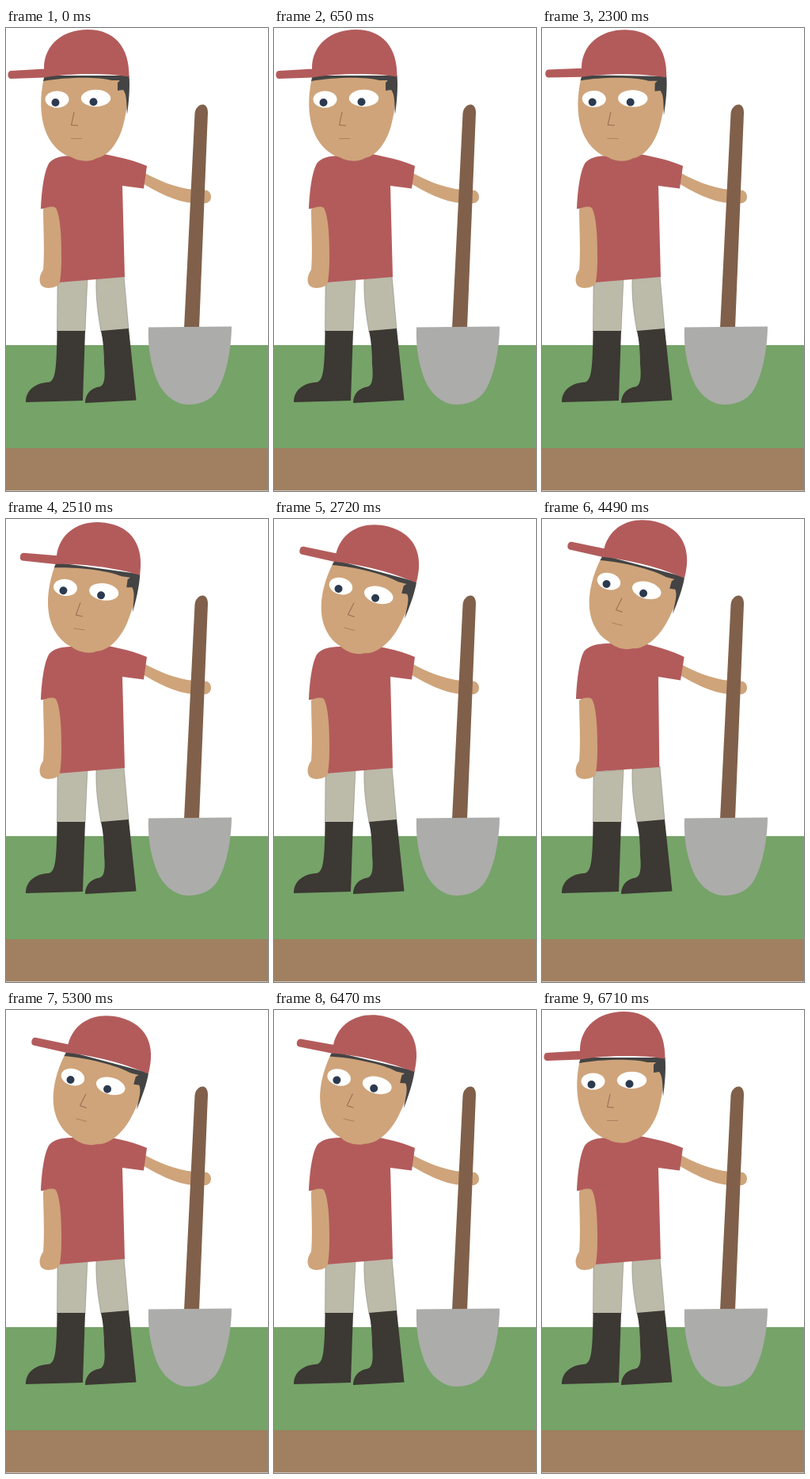
These frames come from a looping animation (331 px wide and 584 px high, 8000 ms). An HTML page:

```html
<!DOCTYPE html>
<html lang="en">
<head>
<meta charset="utf-8">
<title>Worker with a shovel</title>
<style>
  html, body { margin: 0; height: 100%; overflow: hidden; background: #fff; }
  svg { display: block; width: 100%; height: 100%; }
  .red { fill: #b35b5b; }
  .skin { fill: #cfa47a; }
  .pants { fill: #bcbaa9; stroke: #444; stroke-width: .3; }
  .boot { fill: #3c3833; }
  .line { fill: none; stroke: #8a5a48; stroke-width: .8; }
</style>
</head>
<body>
<svg viewBox="0 0 331 584">
  <rect y="400" width="331" height="130" fill="#75a368"/>
  <rect y="530" width="331" height="53.5" fill="#a08061"/>

  <!-- right arm, behind the shovel -->
  <path class="skin" d="M165 177C190 192 215 202 238 204L250 205C256 204 259 208 259 213C259 218 256 221 250 221L236 221C215 219 192 208 168 193Z"/>
  <path fill="#80604a" d="M238.500 108C239 101 244 96.500 248.500 96.500C253 97 255 101 255 107L244 379H225Z"/>
  <path fill="#acacaa" d="M180 377.500L285 376.500C285 401 279 440 265 460C256 471 243 475 231 475C213 475 197 462 189 440C182 420 179 400 180 377.500Z"/>

  <path class="pants" d="M65 319L103 316L100 383H64.500Z"/>
  <path class="pants" d="M114 315L149 312L155 380L120 383C116 360 113 340 114 315Z"/>
  <path class="boot" d="M64.500 382H100L97 470L25 472C25 456 38 448 52 447C62 447 64 435 64.500 382Z"/>
  <path class="boot" d="M120 382L155 379L164.500 469.500L100 473C100 461 108 454 118 452.500C126 451 125 435 124 424C124 410 123 395 120 382Z"/>

  <path class="red" id="shirt"/>
  <path class="skin" d="M47 229C50 226 59 224 63 227C69 238 70 265 70 290C70 305 69 315 67.500 323C63 328 50 330 45 325C41 320 42 312 47 305C49 280 47 250 47 229Z"/>

  <g id="head">
    <path class="skin" d="M48 62C42 90 44 110 48 124C54 146 70 160 83 163C92 169 108 169 115 164C131 161 143 142 148 123C153 104 155 85 155 62Z"/>
    <path fill="#444" d="M47 67L49 60L155.500 60C157 75 155 95 153 109C152 96 153 84 148 78L141 79V69L144 66H133C115 61 75 62 47 67Z"/>
    <path class="red" d="M48 62V51C48 21 72 2 103 2C138 2 156 25 155.500 61.500C125 56.500 80 57 48 62.500L6 64C1.500 64 1 54.500 6 54L49 51.500Z"/>
    <ellipse cx="64.500" cy="90" rx="15" ry="10.500" fill="#fff"/>
    <ellipse cx="113.500" cy="88.500" rx="18.700" ry="10.700" fill="#fff"/>
    <g fill="#2c3a50">
      <ellipse class="pupil" cx="62.500" cy="94" rx="5"/>
      <ellipse class="pupil" cx="110.500" cy="93.300" rx="5"/>
    </g>
    <path class="line" d="M86 106L82.500 122.500L91 123"/>
    <path class="line" d="M82 139.500H96" opacity=".6"/>
  </g>
</svg>
<script>
const LOOP = 8000, STEP = 30, OFFSET = 20;
const head = document.getElementById('head');
const shirt = document.getElementById('shirt');
const pupils = document.querySelectorAll('.pupil');

const ramp = (t, a, b) => Math.min(1, Math.max(0, (t - a) / (b - a)));
// rises to 1 halfway between a and b, then falls back to 0
const pulse = (t, a, b) => 1 - Math.abs(2 * ramp(t, a, b) - 1);

// b: breath, 0 to 1
const shirtPath = b => `M${44 - b} ${228 - b}
  C${45 - b} ${205 - 2 * b} ${48 - b} ${182 - 4 * b} ${54 - b} ${171 - 4 * b}
  C60 ${163 - 4 * b} 70 ${161.5 - 4 * b} 82 ${161 - 4 * b}
  L121 ${158.5 - 3 * b}
  C142 ${162.5 - 3 * b} ${164 + b} ${167.5 - b} ${178 + 1.7 * b} 174
  L${174 + b} ${202.5 + b} L147 199
  L${150 - 1.7 * b} ${314 - b} L${66 + b} ${321 - 2.5 * b} L62 227Z`;

function draw(t) {
  t = Math.floor((t - OFFSET) / STEP) * STEP + OFFSET;
  const tilt = 15 * (ramp(t, 2270, 2720) - ramp(t, 6440, 6710));
  const breath = pulse(t, 4280, 4700);
  const blink = pulse(t, 470, 650) + pulse(t, 5060, 5300);
  head.setAttribute('transform', `translate(0 ${-6 * breath}) rotate(${tilt} 94.8 163.2)`);
  shirt.setAttribute('d', shirtPath(breath));
  for (const p of pupils) p.setAttribute('ry', 5 * (1 - 0.9 * blink));
}

function tick() {
  draw(performance.now() % LOOP);
  requestAnimationFrame(tick);
}
tick();
</script>
</body>
</html>
```
